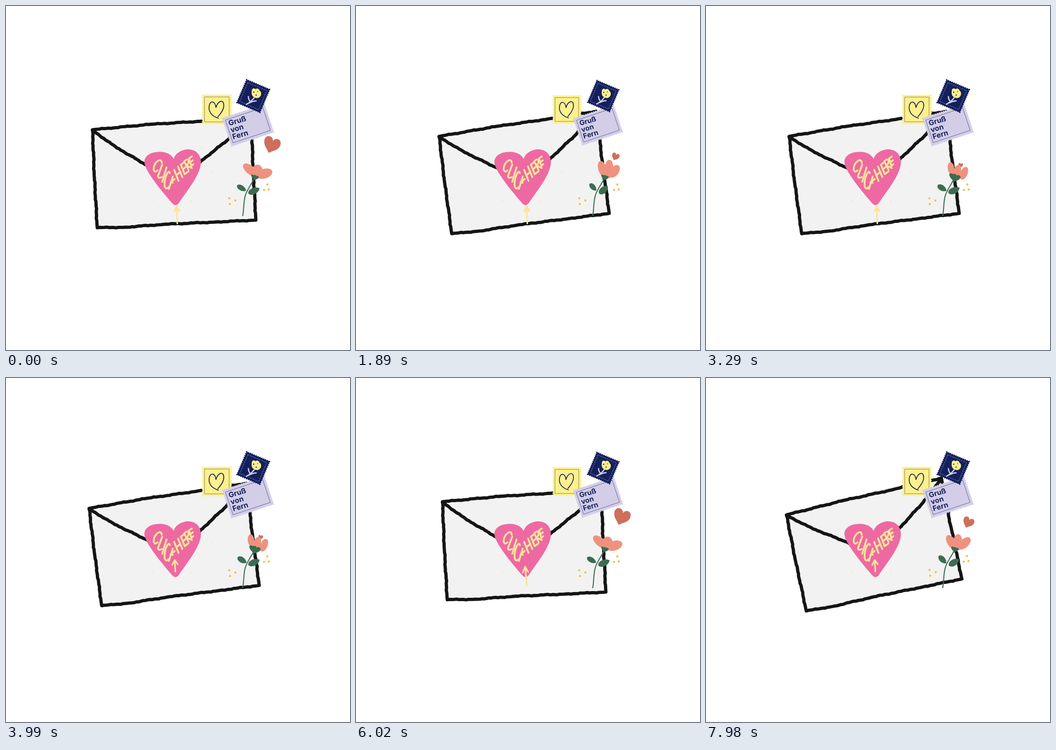
Animation, 720 px wide and 720 px high, one loop 8000 ms. Source, as an HTML page with a canvas:

```html
<!DOCTYPE html>
<html lang="de">
<head>
<meta charset="utf-8">
<title>Click here</title>
<style>
html, body { margin: 0; width: 100%; height: 100%; overflow: hidden; background: #fff; }
canvas { display: block; width: 720px; height: 720px; }
</style>
</head>
<body>
<canvas id="stage" width="720" height="720" role="img" aria-label="Envelope with a heart: CLICK HERE"></canvas>
<script>
const ctx = document.getElementById('stage').getContext('2d');
const LOOP = 8000, TICK = 70;
const NAVY = '#14205c', YELLOW = '#fdf08d', CREAM = '#fbe59c', LILAC = '#d3cde7';
const PINK = '#ee69a2', SALMON = '#ee927f', RUST = '#cf6f5b', GREEN = '#3c6c52', GOLD = '#f0c24b';

const mod = (a, n) => ((a % n) + n) % n;

function fill(d, color) {
  ctx.fillStyle = color;
  ctx.fill(d instanceof Path2D ? d : new Path2D(d));
}

function stroke(d, color, width) {
  ctx.strokeStyle = color;
  ctx.lineWidth = width;
  ctx.lineCap = ctx.lineJoin = 'round';
  ctx.stroke(d instanceof Path2D ? d : new Path2D(d));
}

function ellipse(x, y, rx, ry, deg, color) {
  ctx.beginPath();
  ctx.ellipse(x, y, rx, ry, deg * Math.PI / 180, 0, 7);
  ctx.fillStyle = color;
  ctx.fill();
}

const dot = (x, y, r, color) => ellipse(x, y, r, r, 0, color);

function at(x, y, deg, scale, draw) {
  ctx.save();
  ctx.translate(x, y);
  ctx.rotate(deg * Math.PI / 180);
  ctx.scale(scale, scale);
  draw();
  ctx.restore();
}

// A brush line with a slightly uneven course.
function brush(points, seed) {
  const path = new Path2D();
  points.forEach(([x, y], i) => {
    if (!i) return path.moveTo(x, y);
    const [px, py] = points[i - 1];
    const len = Math.hypot(x - px, y - py), n = Math.ceil(len / 5);
    for (let j = 1; j <= n; j++) {
      const u = j / n, s = u * len + seed * 17;
      const off = j === n ? 0 : 0.5 * Math.sin(s * 0.13) + 0.45 * Math.sin(s * 0.47);
      path.lineTo(px + (x - px) * u - (y - py) / len * off, py + (y - py) * u + (x - px) / len * off);
    }
  });
  return path;
}

const CENTER = [352, 353.5];
const outline = brush([[181, 259], [298, 248], [410, 241], [513, 233], [517, 335], [523, 448],
  [440, 452], [330, 457], [250, 463], [191, 464], [185, 360], [181, 259]], 1);
const flap = brush([[181, 260], [232, 297], [262, 314], [294, 333], [351, 372], [407, 326], [440, 299], [468, 277], [513, 235]], 2);

function envelope(deg) {
  at(...CENTER, deg, 1, () => {
    ctx.translate(-CENTER[0], -CENTER[1]);
    fill(outline, '#f2f2f2');
    stroke(outline, '#151515', 6.8);
    stroke(flap, '#151515', 6.8);
  });
}

const LETTERS = [
  'M326 328Q325 320 318 324Q309 331 309 342Q311 350 317 344',
  'M327 332L318 356Q319 362 326 358',
  'M336 338L327 368',
  'M343 350Q342 343 337 351Q331 363 332 377Q335 386 340 379',
  'M349 357L341 383M353 362L344 370L349 370',
  'M352 343L361 366M360 336L369 358M357 354L365 347',
  'M373 327L366 332L374 352L382 346M370 342L376 337',
  'M382 343L373 325Q382 317 382 326Q382 331 377 334L389 339',
  'M389 315L383 319L388 335L392 331M386 327L391 323'
].join('');

function mainHeart() {
  fill('M351 320C345 308 330 303 313 306C297 308 288 318 290 329C293 350 335 398 348 413Q355 421 362 412' +
    'C380 385 408 352 408 326C407 308 395 299 378 300C365 302 354 309 351 320Z', PINK);
  stroke(LETTERS, CREAM, 3.7);
}

// tip x, tip y, tail x, tail y, head size
const ARROWS = [[357, 419, 358.5, 455, 11], [354, 395, 357.5, 434, 12], [353, 381, 354.5, 405, 10]];

function arrow(i) {
  const [x, y, tx, ty, h] = ARROWS[i];
  stroke(`M${x} ${y}L${tx} ${ty}M${x - 5} ${y + h}L${x} ${y}L${x + 6.5} ${y + h - 1}`, CREAM, 3.3);
  if (!i) fill(`M${x} ${y}L${x - 5} ${y + h}L${x + 6} ${y + h}Z`, CREAM);
}

function stampBase(w, h, color) {
  const x = w / 2 - 1.2, y = h / 2 - 1.2;
  ctx.fillStyle = color;
  ctx.fillRect(-x, -y, 2 * x, 2 * y);
  const bumps = (len, place) => {
    const n = Math.round(len / 4.4);
    for (let i = 0; i <= n; i++) {
      const p = -len / 2 + len * i / n;
      [-1, 1].forEach(side => dot(...place(p, side), 1.5, color));
    }
  };
  bumps(2 * x, (p, s) => [p, s * y]);
  bumps(2 * y, (p, s) => [s * x, p]);
}

function frame(w, h, color, dash) {
  ctx.setLineDash(dash);
  stroke(`M${-w / 2} ${-h / 2}h${w}v${h}h${-w}Z`, color, 0.8);
  ctx.setLineDash([]);
}

function stamps(scale) {
  at(441.5, 216.5, 0, scale, () => {
    stampBase(61, 61, YELLOW);
    frame(50, 51, '#6b6a62', []);
    stroke('M-2 -4C-4 -18 -14 -19 -16 -6C-17 6 -9 14 3 18M-2 -4C2 -18 14 -22 14 -8C14 2 6 10 2 15', NAVY, 1.7);
  });
  at(506.5, 249.5, -18.4, scale, () => {
    stampBase(92, 62, LILAC);
    frame(80, 49, '#545a8c', []);
    ctx.rotate(0.04);
    ctx.fillStyle = NAVY;
    ctx.font = '700 15px Inter, "Open Sans", sans-serif';
    ['Gruß', 'von', 'Fern'].forEach((word, i) => ctx.fillText(word, -37, -9.5 + i * 14.5));
  });
  at(517.5, 188.5, 23, scale, () => {
    stampBase(53, 53, NAVY);
    frame(42, 42, '#7f88b5', [3, 2]);
  });
  at(517.5, 188.5, 0, scale, () => {
    stroke('M3 2Q-3 11 -14 17M-10 1Q-10 7 -6 11M6 10Q0 10 -8 14', LILAC, 2.5);
    fill('M-3 -11C-3 -16 2 -17 5 -14C8 -17 12 -15 13 -11C17 -9 17 -2 14 1C11 5 5 5 2 2C-3 1 -4 -6 -3 -11Z', YELLOW);
    dot(1, -8, 1.3, NAVY);
    dot(6, -2, 1.2, NAVY);
    dot(9, -9, 0.9, NAVY);
  });
}

// petals and leaves: x, y, rx, ry, angle; heart: x, y, width, angle
const POSES = [
  { petals: [[513, 340, 7, 13, -8], [526, 346, 7.5, 14, 14], [540, 350, 7.5, 14, 22]],
    heart: [533, 333, 9, 10], cup: 12, leaves: [[494, 381, 11, 6.5, 32], [519, 386, 13, 7.5, -24]] },
  { petals: [[516, 341, 9, 17, -18], [529, 339, 9, 17, 8], [541, 346, 9, 15, 35]],
    heart: [543, 315, 15, 22], cup: 8, leaves: [[496, 379, 10, 6, 48], [518, 385, 12, 7.5, -42]] },
  { petals: [[514, 344, 9, 17, -32], [527, 341, 9, 14, 5], [541, 346, 9, 16, 46]],
    heart: [549, 302, 22, 24], cup: 8, leaves: [[495, 380, 11, 6.5, 45], [519, 386, 12.5, 7.5, -32]] },
  { petals: [[511, 343, 9, 18, -50], [526, 345, 11, 13, 5], [541, 351, 10, 17, 72]],
    heart: [556, 290, 33, 20], cup: 8, leaves: [[493, 381, 11, 6, 30], [519, 387, 13, 7.5, -24]] }
];

function smallHeart(x, y, width, deg) {
  at(x, y, deg, width / 30, () =>
    fill('M0 -7C-2 -17 -17 -16 -16 -4C-15 6 -6 10 -1 16Q0 17 2 15C7 9 16 6 16 -4C16 -16 3 -17 0 -7Z', RUST));
}

function flower(i) {
  const { petals, heart, cup, leaves } = POSES[i];
  smallHeart(...heart);
  stroke('M521 358C514 374 503 385 500 400C497 414 498 426 495.5 439', GREEN, 2.1);
  leaves.forEach(([x, y, rx, ry, deg]) => at(x, y, deg, 1, () =>
    fill(`M${-rx} 0C${-rx * 0.8} ${-ry * 1.2} ${rx * 0.5} ${-ry * 1.2} ${rx} 0C${rx * 0.5} ${ry * 1.2} ${-rx * 0.8} ${ry * 1.2} ${-rx} 0Z`, GREEN)));
  petals.forEach(p => ellipse(...p, SALMON));
  ellipse(527, 353, 9, 7, 15, SALMON);
  at(521, 358, 12, cup / 12, () =>
    fill('M-13 -3Q-10 -9 -5 -4Q-1 -9 3 -4Q8 -8 12 -2C11 4 6 6 2 9Q-2 11 -4 7Q-10 4 -13 -3Z', GREEN));
  const shift = i === 2 ? 0.7 : 0;
  [[547, 373.5], [540, 385], [550, 384]].forEach(([x, y]) => dot(x - shift, y - shift, 2.3, GOLD));
  [[467.3, 402.5], [480, 407], [468.5, 414.5]].forEach(([x, y]) => dot(x + shift, y - shift, 2.3, GOLD));
}

const SPECKS = [[334, 298], [410, 297], [277, 318], [431, 347], [306, 407], [387, 408]];
const TILTS = [0, -4.6, -8.9, -4.6];

function draw(ms) {
  const step = Math.floor(Math.floor(mod(ms, LOOP) / TICK) * 2 / 3);
  ctx.fillStyle = '#fff';
  ctx.fillRect(0, 0, 720, 720);
  envelope(TILTS[Math.floor(mod(step, 8) / 2)]);
  SPECKS.forEach(([x, y]) => dot(x, y, 1.4, '#f7e8ae'));
  mainHeart();
  arrow(Math.floor(mod(step / 7.75, 1) * 3));
  stamps(1 + 0.026 * Math.cos(step / 7.45 * 2 * Math.PI));
  flower(Math.floor(mod(step / 7.08 - 0.215, 1) * 4));
}

const start = performance.now();
function tick() {
  draw(performance.now() - start);
  requestAnimationFrame(tick);
}
tick();
</script>
</body>
</html>
```
